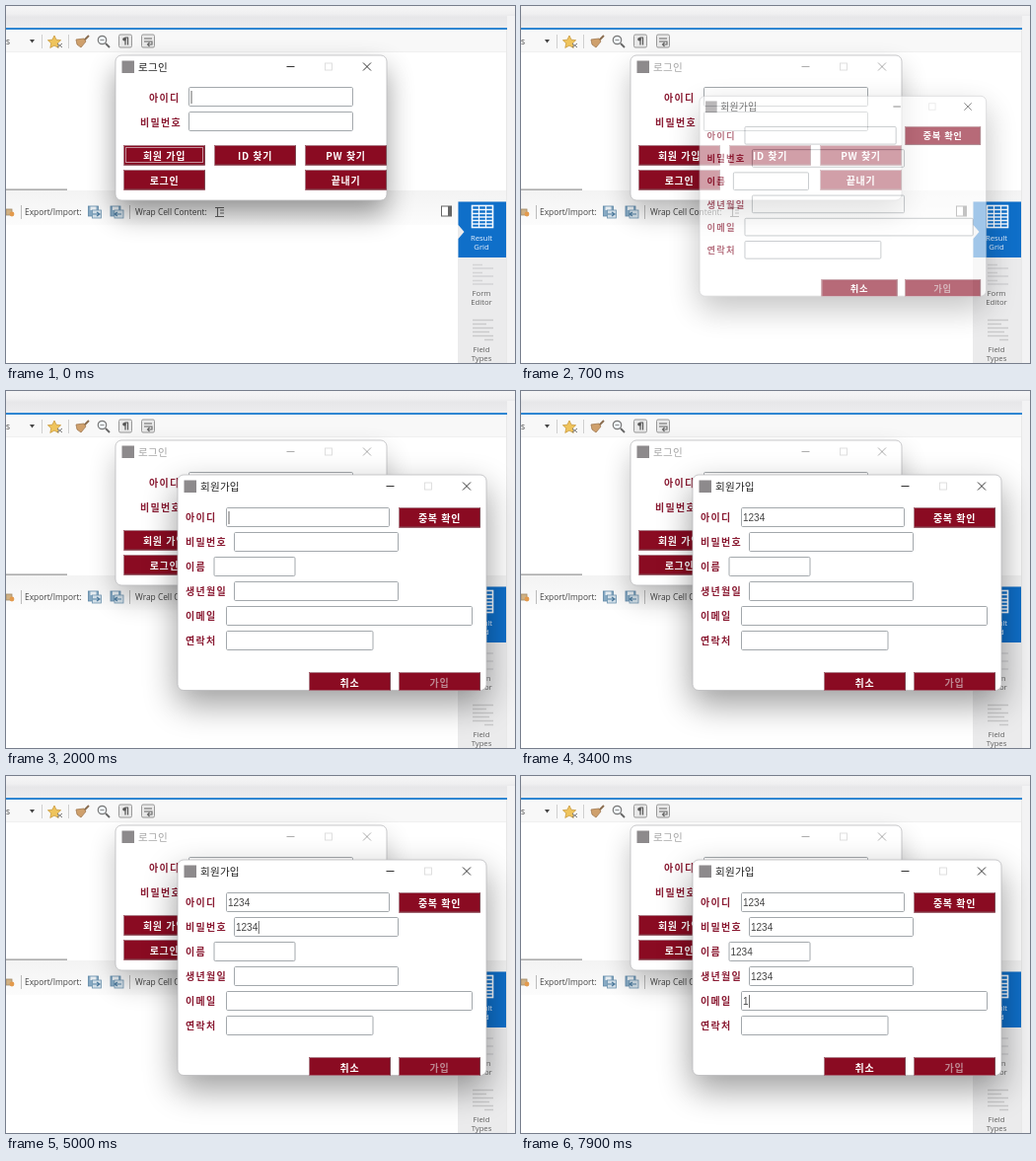
An HTML page that plays this animation: 516x362 px, repeating every 8 s.

```html
<!DOCTYPE html>
<html lang="ko">
<head>
<meta charset="utf-8">
<title>회원가입</title>
<style>
html, body { margin: 0; width: 100%; height: 100%; overflow: hidden; background: #fff; }
svg { display: block; width: 516px; height: 362px; }
text { white-space: pre; dominant-baseline: central; }
.ko { font-family: "Noto Sans CJK KR", "Noto Sans CJK", sans-serif; font-size: 10.6px; letter-spacing: .2px; fill: #222; }
.label { font-size: 10px; font-weight: 700; fill: #8a1a32; letter-spacing: 1.3px; }
.btn { font-size: 10px; font-weight: 700; fill: #fff; text-anchor: middle; letter-spacing: .7px; }
.ui { font-family: "Open Sans", "Noto Sans", sans-serif; font-size: 8.4px; font-weight: 500; fill: #444; }
.tab { font-size: 7.7px; text-anchor: middle; }
.value { font-family: "Liberation Sans", Arial, sans-serif; font-size: 10px; fill: #444; }
</style>
</head>
<body>
<svg id="stage" viewBox="0 0 516 362">
  <defs>
    <linearGradient id="bar" x2="0" y2="1">
      <stop offset="0" stop-color="#f5f5f6"/><stop offset=".35" stop-color="#f0f0f1"/>
      <stop offset=".5" stop-color="#e7e7e9"/><stop offset="1" stop-color="#ececee"/>
    </linearGradient>
    <linearGradient id="band" x2="0" y2="1">
      <stop offset="0" stop-color="#f3f3f3"/><stop offset="1" stop-color="#fcfcfc"/>
    </linearGradient>
    <filter id="soft" x="-40%" y="-60%" width="180%" height="220%"><feGaussianBlur stdDeviation="14"/></filter>
    <filter id="wide" x="-40%" y="-50%" width="180%" height="200%"><feGaussianBlur stdDeviation="17"/></filter>
    <clipPath id="clipLogin"><rect x="111" y="50" width="275" height="147" rx="6"/></clipPath>
    <clipPath id="clipJoin"><rect x="174" y="85" width="313" height="218.5" rx="6"/></clipPath>
  </defs>
</svg>
<script>
const NS = 'http://www.w3.org/2000/svg';
const stage = document.getElementById('stage');

function add(parent, tag, attrs, text) {
  const el = document.createElementNS(NS, tag);
  for (const k in attrs) el.setAttribute(k, attrs[k]);
  if (text !== undefined) el.textContent = text;
  parent.appendChild(el);
  return el;
}
const group = (p, attrs = {}) => add(p, 'g', attrs);
const rect = (p, x, y, w, h, fill, more = {}) => add(p, 'rect', { x, y, width: w, height: h, fill, ...more });
const path = (p, d, stroke, width = 1, fill = 'none') => add(p, 'path', { d, stroke, 'stroke-width': width, fill });
const label = (p, cls, x, y, s) => add(p, 'text', { class: cls, x, y }, s);
const show = (el, on) => el.setAttribute('visibility', on ? 'visible' : 'hidden');

// Editor behind the dialogs
function drawBackdrop() {
  const g = group(stage);
  rect(g, 0, 0, 516, 22, 'url(#bar)');
  rect(g, 508, 10, 8, 352, '#f3f3f4');
  rect(g, 0, 22, 508, 2, '#2f86d2');
  rect(g, 0, 24, 508, 23, '#f8f8f8');
  rect(g, 0, 46, 508, 1, '#f0f0f0');
  rect(g, 0, 187, 508, 35, 'url(#band)');
  rect(g, 0, 185.5, 62, 1.3, '#999');
  rect(g, 458, 198, 49, 164, '#ebebec');
  rect(g, 507, 24, 1, 338, '#e8e8e8');
  drawTopTools(g);
  drawResultTools(g);
  drawTabs(g);
}

function drawTopTools(g) {
  label(g, 'ui', 0, 35.5, 's');
  path(g, 'M24 34h5l-2.500 3.500z', 'none', 0, '#444');
  path(g, 'M36.5 29v14M63.5 29v14', '#cfcfcf');
  path(g, 'M49 30l2 4.2 4.6.5-3.4 3.1 1 4.6-4.2-2.3-4.2 2.3 1-4.6-3.4-3.1 4.6-.5z', '#c99a3c', .8, '#efc45c');
  path(g, 'M52 38l5 4M57 38l-5 4', '#777', 1);
  path(g, 'M84 30l-6 6', '#8a6d50', 2);
  path(g, 'M71 34l8-1 2 3-5 6-4-3z', '#a17a52', .8, '#cfa06c');
  add(g, 'circle', { cx: 97.5, cy: 34.5, r: 4.2, fill: '#eef2f5', stroke: '#777', 'stroke-width': 1.2 });
  path(g, 'M101 38l4 4', '#666', 1.8);
  path(g, 'M95.5 34.5h4', '#777', .8);
  for (const x of [114.5, 137.5]) rect(g, x, 29, 13, 13, '#e9e9e9', { rx: 1.5, stroke: '#999' });
  path(g, 'M121 39.5v-7.5h3M123.5 32v7.5', '#555', 1.2);
  add(g, 'circle', { cx: 120, cy: 33.7, r: 1.8, fill: '#555' });
  path(g, 'M140 33h8M140 36h8v3h-4M145.500 37l-2 2 2 2', '#666', 1.1);
}

function disk(g, x, arrow) {
  rect(g, x, 203, 10, 10, '#86a9c3', { stroke: '#5d86a5', 'stroke-width': .8 });
  rect(g, x + 2, 203.5, 6, 3.5, '#e8eef2');
  rect(g, x + 4, 207, 9, 8, '#d3e0e9', { stroke: '#6e93ae', 'stroke-width': .8 });
  path(g, arrow, '#4f7c9f', 1.2);
}

function drawResultTools(g) {
  rect(g, 0, 206, 6, 6, '#cfb083', { stroke: '#a08b69', 'stroke-width': .8 });
  add(g, 'circle', { cx: 6, cy: 211, r: 2.4, fill: '#e39a4c' });
  path(g, 'M15.500 202v14M125.500 202v14', '#bbb');
  label(g, 'ui', 19, 208.5, 'Export/Import:');
  disk(g, 83.5, 'M88 211h7M92 209l3 2-3 2');
  disk(g, 106, 'M117 211h-7M113 209l-3 2 3 2');
  label(g, 'ui', 131, 208.5, 'Wrap Cell Content:');
  path(g, 'M212 204.500h9M212 213.500h9M214.500 205v8M217 207h4M217 210h4', '#666', 1.1);
  rect(g, 441.5, 203, 10, 10, '#fff', { stroke: '#666' });
  rect(g, 448, 203, 3.5, 10, '#666');
}

function drawTabs(g) {
  path(g, 'M458.500 198.500h48.500v56.500h-48.500v-19l6-7-6-7z', 'none', 0, '#0f6fc9');
  rect(g, 472.5, 202.5, 21, 22, 'none', { stroke: '#f4f9ff', 'stroke-width': 1.6 });
  path(g, 'M473 206.500h21M473 210.500h21M473 214h21M473 217.500h21M473 221h21M479.500 203v21M486.500 203v21', '#f4f9ff', 1.3);
  path(g, 'M473 262.500h10M473 266h21M473 270.500h10M473 274h21M473 278.500h10M473 282h21', '#d4d4d5', 1.6);
  path(g, 'M473 318.500h21M473 322.500h14M473 326.500h21M473 330.500h17M473 334.500h21M485 338.500h9', '#cacacb', 1.6);
  [['Result', 235], ['Grid', 244], ['Form', 290.5], ['Editor', 299.5], ['Field', 347.500], ['Types', 356.5]].forEach(([s, y], i) => {
    label(g, 'ui tab', 482, y, s).style.fill = i < 2 ? '#e8f3ff' : '#606060';
  });
}

// Dialog parts
function frame(g, x, y, w, h, title) {
  rect(g, x, y, w, h, '#fff', { rx: 6, stroke: '#bcbcbe', 'stroke-width': .8 });
  rect(g, x + 6.5, y + 5.5, 12.5, 12.5, '#8d8a8c');
  const r = x + w, mid = y + 11.5;
  const bar = group(g);
  label(bar, 'ko', x + 23, y + 11, title);
  path(bar, `M${r - 101.5} ${mid}h8M${r - 24} ${mid - 4}l8 8M${r - 16} ${mid - 4}l-8 8`, '#333', 1);
  rect(g, r - 62.5, y + 8, 7, 7, 'none', { stroke: '#dcdcdc', 'stroke-width': .9 });
  return bar;
}

function field(g, x, y, w) {
  rect(g, x + .5, y + .5, w - 1, 19, '#fff', { rx: 1.2, stroke: '#a3a8ac' });
  const text = label(g, 'value', x + 2, y + 10.5, '');
  const caret = rect(g, 0, y + 4, 1, 13, '#666');
  show(caret, false);
  return { text, caret, x: x + 2 };
}

function button(g, x, y, s, color = '#fff') {
  rect(g, x, y, 83, 20.5, '#8a0b22');
  path(g, `M${x + .5} ${y + 20.5}v-20h82.500`, '#ad7d87', 1);
  path(g, `M${x + 1} ${y + 20}h81.500v-19.500`, '#7c4650', 1);
  label(g, 'ko btn', x + 41.5, y + 10, s).style.fill = color;
}

function put(input, s, caretOn) {
  input.text.textContent = s;
  input.caret.setAttribute('x', input.x + .5 + s.length * 5.56);
  show(input.caret, caretOn);
}

drawBackdrop();

// Login dialog
const login = group(stage);
const loginShade = rect(login, 111, 64, 275, 147, '#000', { rx: 8, filter: 'url(#soft)' });
const loginBar = frame(login, 111, 50, 275, 147, '로그인');
const loginBody = group(login, { 'clip-path': 'url(#clipLogin)' });
label(loginBody, 'ko label', 145, 92, '아이디');
label(loginBody, 'ko label', 136, 117, '비밀번호');
const loginId = field(loginBody, 185, 82, 167);
field(loginBody, 185, 107, 167);
[[119, 141, '회원 가입'], [211, 141, 'ID 찾기'], [303, 141, 'PW 찾기'], [119, 166, '로그인'], [303, 166, '끝내기']]
  .forEach(([x, y, s]) => button(loginBody, x, y, s));
const ring = rect(loginBody, 121.5, 143.5, 78, 15, 'none', { stroke: '#c4929c', 'stroke-width': 1 });

// Sign-up dialog
const join = group(stage);
rect(join, 173, 98, 315, 220, '#000', { rx: 8, filter: 'url(#wide)', opacity: .38 });
frame(join, 174, 85, 313, 218.5, '회원가입');
const joinBody = group(join, { 'clip-path': 'url(#clipJoin)' });
const inputs = [
  ['아이디', 223, 166], ['비밀번호', 231, 167], ['이름', 210.5, 83],
  ['생년월일', 231, 167], ['이메일', 223, 250], ['연락처', 223, 149.5]
].map(([name, x, w], i) => {
  label(joinBody, 'ko label', 182, 127.7 + 25 * i, name);
  return field(joinBody, x, 118 + 25 * i, w);
});
button(joinBody, 398, 118, '중복 확인');
button(joinBody, 307, 285, '취소');
button(joinBody, 398, 285, '가입', '#bd8791');

// Focus time of each field, then its key presses
const typing = [
  [900, 2300, 2450, 2650, 2800],
  [3700, 4200, 4400, 4500, 4700],
  [5100, 5400, 5600, 5800, 5900],
  [6400, 6600, 6800, 7000, 7200],
  [7500, 7800]
];
const LOOP = 8000, OPEN = 600, OPEN_MS = 250;

function draw(t) {
  const opened = t >= OPEN;
  put(loginId, '', t < 100);
  show(ring, !opened);
  loginBar.setAttribute('opacity', opened ? .4 : 1);
  loginShade.setAttribute('opacity', opened ? .24 : .4);

  show(join, opened);
  const p = Math.min(1, Math.max(0, (t - OPEN) / OPEN_MS));
  const k = .88 + .12 * p;
  join.setAttribute('opacity', Math.min(1, 1.5 * p));
  join.setAttribute('transform',
    `translate(${330.5 - 7 * (1 - p)} ${194.5 - 2.5 * (1 - p)}) scale(${k}) translate(-330.5 -194.5)`);

  typing.forEach((times, i) => {
    const past = times.filter(at => at <= t);
    const next = typing[i + 1];
    const focused = opened && past.length > 0 && !(next && t >= next[0]);
    const blink = Math.floor((t - past[past.length - 1]) / 500) % 2 === 0;
    put(inputs[i], '1234'.slice(0, Math.max(0, past.length - 1)), focused && blink);
  });
}

function tick() {
  draw(performance.now() % LOOP);
  requestAnimationFrame(tick);
}
tick();
</script>
</body>
</html>
```
